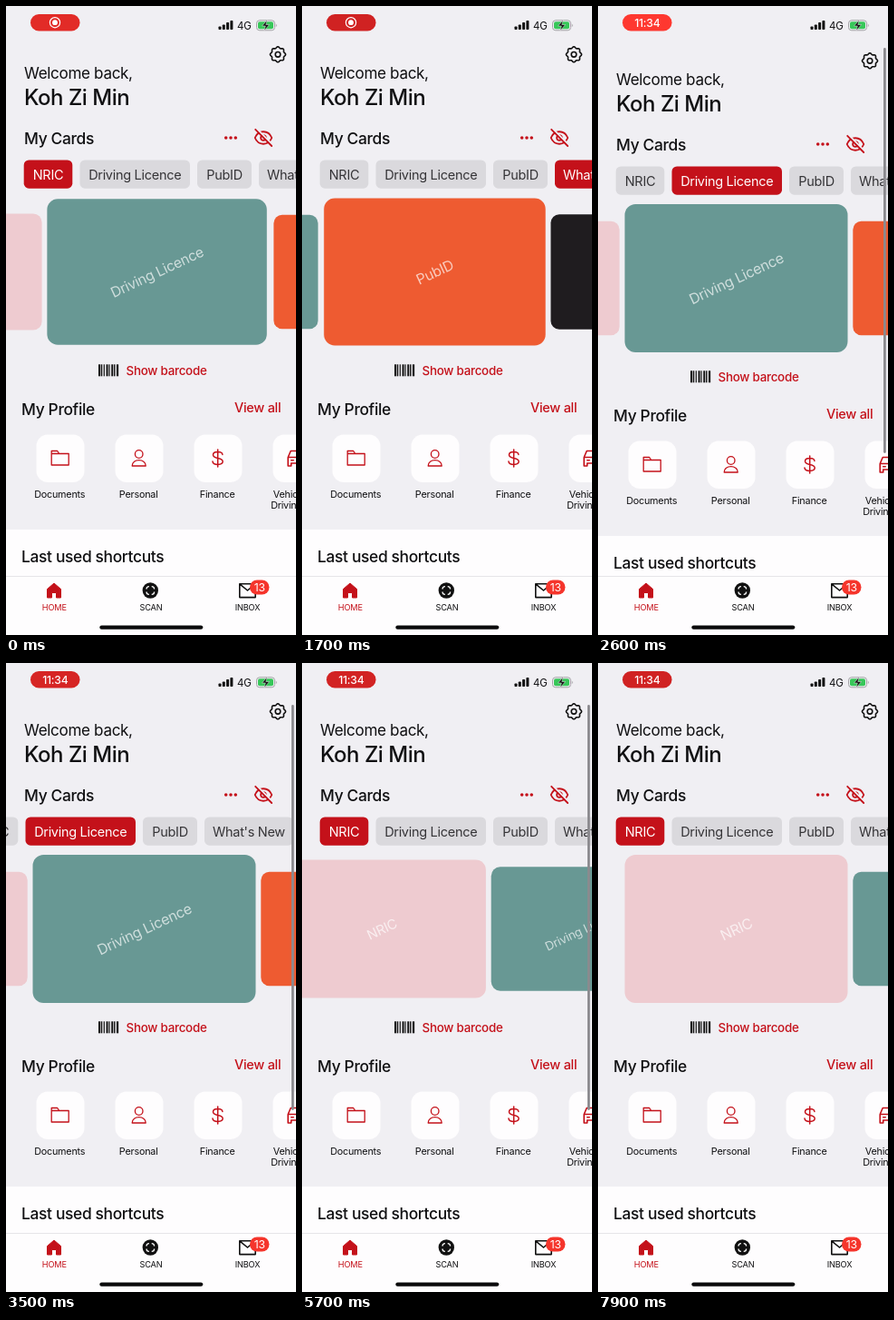
Write an HTML page that moves like this. It is 320 px wide and 692 px high and loops after 8000 ms.

```html
<!DOCTYPE html>
<html lang="en">
<head>
<meta charset="utf-8">
<title>Digital wallet home</title>
<style>
  html, body { margin: 0; width: 100%; height: 100%; overflow: hidden; background: #f0eff3; }
  svg { display: block; width: 100vw; height: 100vh; }
  text { font-family: Inter, Roboto, "Liberation Sans", sans-serif; letter-spacing: -.02em; fill: #101012; }
  .mid { text-anchor: middle; }
  .head { font-size: 17.4px; font-weight: 500; }
  .link { font-size: 14.5px; font-weight: 500; fill: #c4111a; }
  .small { font-size: 10.8px; text-anchor: middle; }
  .tab { font-size: 9.2px; text-anchor: middle; }
  .chip text { font-size: 14.5px; text-anchor: middle; fill: #353437; }
  .chip rect { fill: #dad9dd; }
  .chip.on rect { fill: #c4111a; }
  .chip.on text { fill: #fff; }
  .card text { font-size: 16px; text-anchor: middle; fill: #fff; fill-opacity: .68; }
  .line { fill: none; stroke: #c4111a; stroke-width: 1.3; stroke-linecap: round; stroke-linejoin: round; }
  .ink { fill: none; stroke: #111; stroke-width: 1.6; stroke-linejoin: round; }
</style>
</head>
<body>
<svg viewBox="0 0 320 692" preserveAspectRatio="none">
  <rect width="320" height="692" fill="#f0eff3"/>

  <g id="page">
    <g id="gear" class="ink" transform="translate(300 53.3)"><circle r="2.8"/></g>
    <text x="20" y="80" font-size="17.1">Welcome back,</text>
    <text x="20" y="109" font-size="24" font-weight="500">Koh Zi Min</text>
    <text x="20" y="152" class="head">My Cards</text>
    <g fill="#c4111a">
      <circle cx="242.7" cy="145" r="1.8"/><circle cx="248" cy="145" r="1.8"/><circle cx="253.3" cy="145" r="1.8"/>
    </g>
    <g class="line" style="stroke-width:1.8" transform="translate(284 145)">
      <path d="M-9.3 0C-5.5-9 5.5-9 9.3 0C5.5 9-5.5 9-9.3 0Z"/>
      <circle r="2.9"/>
      <g id="slash">
        <path d="M-6.6-9.4L10.4 8" stroke="#f0eff3" stroke-width="2"/>
        <path d="M-8.8-9.2L9.2 9"/>
      </g>
    </g>

    <g id="wallet">
      <g id="chips"></g>
      <g id="cards"></g>
      <g id="bars" fill="#111"></g>
      <text x="132.6" y="405.5" class="link" style="font-size:13.4px">Show barcode</text>
    </g>

    <g id="lower">
      <text x="17" y="193" class="head">My Profile</text>
      <text x="252" y="190" class="link">View all</text>
      <g id="tiles"></g>
      <rect y="319" width="320" height="202" fill="#fefdfe"/>
      <text x="17" y="355" class="head">Last used shortcuts</text>
      <g id="shortcuts"></g>
      <text x="160" y="498" class="link mid">View all shortcuts</text>
    </g>
  </g>

  <rect id="scrollbar" x="315" y="46" width="2.8" rx="1.4" fill="#8b8a8e"/>

  <rect id="pill" x="27" y="9" width="54.5" height="18.5" rx="9.25"/>
  <g id="record" fill="none" stroke="#fff" stroke-width="1.2">
    <circle cx="54" cy="18.2" r="5.6"/><circle cx="54" cy="18.2" r="2.9" fill="#fff" stroke="none"/>
  </g>
  <text id="clock" x="54.3" y="22.6" class="mid" font-size="12.2" font-weight="500" style="fill:#fff">11:34</text>
  <g id="signal" fill="#111"></g>
  <text x="255" y="25.6" font-size="11.5">4G</text>
  <rect x="276.5" y="15.8" width="20" height="11" rx="3.3" fill="none" stroke="#a3a2a6"/>
  <rect x="278" y="17.3" width="17" height="8" rx="2" fill="#37c759"/>
  <path d="M297.8 19.4q2 1.9 0 3.8z" fill="#a3a2a6"/>
  <path d="M288.2 15.3l-5.6 6.7h3.7l-1.5 5.3l5.8-6.8h-3.8z" fill="#111" stroke="#f0eff3" stroke-width=".5"/>

  <rect y="627" width="320" height="65" fill="#fefdfe"/>
  <path d="M0 627.5H320" stroke="#e6e5e9"/>
  <path d="M45.5 641.5L53 635l7.5 6.5V651h-5v-5.5h-5V651h-5z" fill="#c4111a" stroke="#c4111a" stroke-linejoin="round"/>
  <circle cx="159.3" cy="643" r="8.7" fill="#111"/>
  <path d="M155 641.6q0-2.9 2.9-2.9M160.7 638.7q2.9 0 2.9 2.9M163.6 644.4q0 2.9-2.9 2.9M157.9 647.3q-2.9 0-2.9-2.9" fill="none" stroke="#fff" stroke-width="1.3"/>
  <path class="ink" d="M257.8 635.8h17.4v14.8h-17.4zl8.7 7.2l8.7-7.2"/>
  <rect x="269" y="631.5" width="21.5" height="16" rx="8" fill="#f5352c"/>
  <text x="279.7" y="644" class="mid" font-size="12.3" style="fill:#fff">13</text>
  <text x="53.3" y="665" class="tab" style="fill:#c4111a">HOME</text>
  <text x="160" y="665" class="tab">SCAN</text>
  <text x="266.5" y="665" class="tab">INBOX</text>
  <rect x="103.3" y="681.4" width="114" height="4.4" rx="2.2" fill="#0b0b0c"/>
</svg>

<script>
const LOOP = 8000, STEP = 100;
const COLLAPSE = 6600, EXPAND = 7500;
const CARD = { x: 152.5, y: 292.5, w: 246, h: 163, pitch: 223.5, shrink: .23 };

const $ = id => document.getElementById(id);
const fill = (id, parts) => { $(id).insertAdjacentHTML('beforeend', parts.join('')); return [...$(id).children]; };
const show = (el, on) => el.setAttribute('visibility', on ? 'visible' : 'hidden');
const move = (el, x, y) => el.setAttribute('transform', `translate(${x} ${y})`);

const passes = [
  { name: 'NRIC', x: 19.7, w: 53.6, color: '#eecbd0' },
  { name: 'Driving Licence', x: 81.5, w: 121.5, color: '#689894' },
  { name: 'PubID', x: 211, w: 60, color: '#ee5b31' },
  { name: "What's New", x: 279, w: 98, color: '#1f1c1f' }
];

const chips = fill('chips', passes.map(p => `<g class="chip">
  <rect x="${p.x}" y="169.5" width="${p.w}" height="31.2" rx="5.5"/>
  <text x="${p.x + p.w / 2}" y="190.5">${p.name}</text></g>`));

const cards = fill('cards', passes.map(p => `<g class="card">
  <rect x="${-CARD.w / 2}" y="${-CARD.h / 2}" width="${CARD.w}" height="${CARD.h}" rx="12" fill="${p.color}"/>
  <text transform="rotate(-25)" y="6">${p.name}</text></g>`));

const icons = {
  folder: '<path d="M-9.5 7.5V-8H-3L-1-5H9.5V7.5ZM-9.5-5H-1"/>',
  person: '<circle cy="-4.5" r="4.3"/><path d="M-7.5 8.5C-7.5 0 7.5 0 7.5 8.5Z"/>',
  dollar: '<path d="M0-9.6V9.6M5.2-4C4.7-8-5.2-8-5.2-3.6C-5.2 1 5.5-1 5.5 3.6C5.5 8-5.2 8-5.7 3.6" stroke-width="1.5"/>',
  car: '<path d="M-9.5 8.5V-1L-6.5-8H6.5L9.5-1V8.5H6V5.5H-6V8.5ZM-9.5-1H9.5M-6 2.3h2.5M3.5 2.3H6" stroke-width="1.6"/>'
};
const labels = (x, y, lines) => lines.map((s, i) => `<text class="small" x="${x}" y="${y + i * 12.5}">${s}</text>`).join('');
const tile = (i, y, color, art, lines) => {
  const x = 60 + 87 * i;
  return `<rect x="${x - 26.5}" y="${y}" width="53" height="52.5" rx="12.5" fill="${color}"/>
    <g class="line" transform="translate(${x - .3} ${y + 26})">${art}</g>${labels(x - .8, y + 69, lines)}`;
};

fill('tiles', [
  ['folder', 'Documents'], ['person', 'Personal'], ['dollar', 'Finance'], ['car', 'Vehicles &amp;', 'Driving Info']
].map(([icon, ...lines], i) => tile(i, 214.5, '#fefdfe', icons[icon], lines)));

fill('shortcuts', [
  tile(0, 376.5, '#f6f7f9', '<circle r="11" fill="#17705c" stroke="none"/>', ['VLN Savings', 'Services']),
  tile(1, 376.5, '#f6f7f9', '<rect x="-11.5" y="-11.5" width="23" height="23" rx="2" fill="#c9252c" stroke="none"/>', ['My', 'NestDesk'])
]);

fill('bars', [2.2, 1.4, 1.2, 2, 1.2, 2, 1.4, 2.2].map((w, i) => `<rect x="${102 + i * 2.85}" y="394.3" width="${w}" height="13"/>`));
fill('signal', [3.5, 5.5, 8, 10].map((h, i) => `<rect x="${234.5 + i * 4.3}" y="${26 - h}" width="3" height="${h}" rx=".8"/>`));

// Rounded cog with eight lobes
const cog = Array.from({ length: 64 }, (_, i) => {
  const a = i * Math.PI / 32, r = 7.8 + .75 * Math.cos(8 * a);
  return `${(r * Math.cos(a)).toFixed(2)} ${(r * Math.sin(a)).toFixed(2)}`;
});
fill('gear', [`<polygon points="${cog.join(' ')}"/>`]);

const ease = u => u < .5 ? 2 * u * u : 1 - 2 * (1 - u) ** 2;
function track(keys, t) {
  const next = keys.findIndex(k => k[0] > t);
  if (next < 0) return keys[keys.length - 1][1];
  if (next === 0) return keys[0][1];
  const [t0, a] = keys[next - 1], [t1, b] = keys[next];
  return a + (b - a) * ease((t - t0) / (t1 - t0));
}
const latest = (keys, t) => keys.filter(k => k[0] <= t).pop()[1];

const swipe = [[0, .937], [100, 1], [400, 1], [800, 2], [900, 2], [1250, 3], [1400, 3],
  [1700, 2.027], [1800, 2], [2000, 2], [2400, 1], [5450, 1], [5853, 0]];
const selection = [[0, 0], [300, 1], [900, 2], [1300, 3], [1900, 2], [2500, 1], [5400, 0]];
const pull = [[2400, 0], [2600, 7], [2900, 0]];
const chipScroll = [[3100, 0], [3500, -60], [3800, -60], [4400, 14.5], [4750, 0]];
const barFade = [[2300, 0], [2500, 1], [7500, 1], [7700, 0]];

function draw(t) {
  const open = t < COLLAPSE || t >= EXPAND;
  const position = track(swipe, t), selected = latest(selection, t);

  move($('page'), 0, track(pull, t));
  move($('chips'), track(chipScroll, t), 0);
  move($('lower'), 0, open ? 257 : 0);
  show($('wallet'), open);
  show($('slash'), open);

  chips.forEach((chip, i) => chip.classList.toggle('on', i === selected));
  cards.forEach((card, i) => {
    const d = i - position;
    const scale = 1 - CARD.shrink * Math.min(1, Math.abs(d));
    card.setAttribute('transform', `translate(${CARD.x + d * CARD.pitch} ${CARD.y}) scale(${scale})`);
  });

  $('scrollbar').setAttribute('height', open ? 446 : 460);
  $('scrollbar').setAttribute('opacity', track(barFade, t));

  const glow = .5 + .5 * Math.cos((t - 2700) / 2100 * 2 * Math.PI);
  const mix = (a, b) => Math.round(a + (b - a) * glow);
  $('pill').setAttribute('fill', `rgb(${mix(208, 255)},${mix(34, 56)},${mix(34, 48)})`);
  show($('record'), t < 2100);
  show($('clock'), t >= 2100);
}

const start = performance.now();
function tick() {
  const elapsed = (performance.now() - start) % LOOP;
  draw(Math.floor(elapsed / STEP) * STEP);
  requestAnimationFrame(tick);
}
tick();
</script>
</body>
</html>
```
